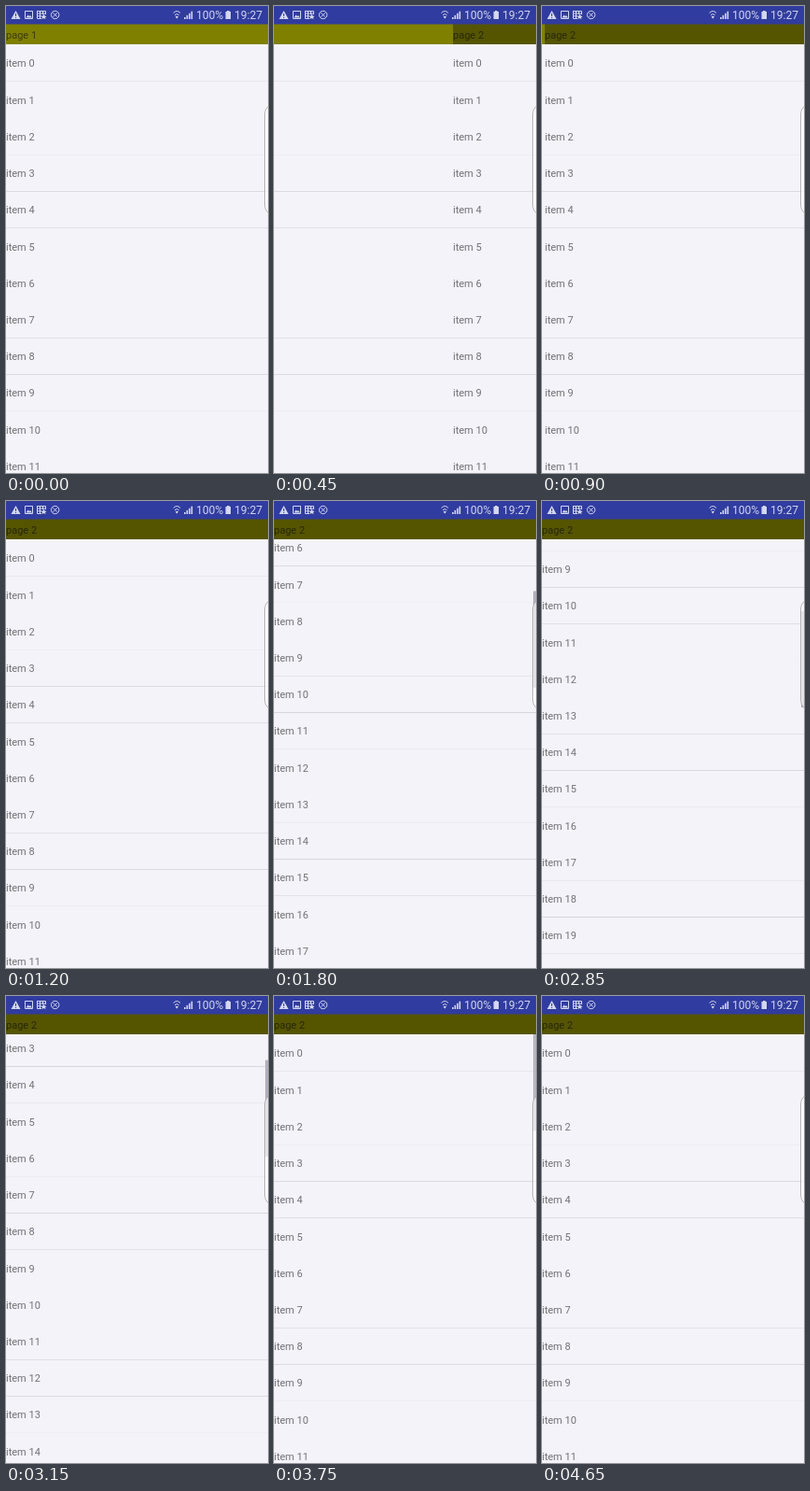
Recreate the animation shown at these times as an HTML page with a canvas. Size 281x500 px, loop 4.95 s.

```html
<!DOCTYPE html>
<html>
<head>
<meta charset="utf-8">
<style>
html, body { margin: 0; height: 100%; overflow: hidden; background: #f4f3f9; }
canvas { display: block; }
</style>
</head>
<body>
<canvas id="stage" width="281" height="500"></canvas>
<script>
const ctx = document.getElementById('stage').getContext('2d');
const W = 281, H = 500, LOOP = 4950, STEP = 150;
const LIST_TOP = 41, ROW = 39.23, ITEMS = 52, MAX_SCROLL = 606.5;
const LIST_H = H - LIST_TOP;

const clamp = (v, lo, hi) => Math.min(hi, Math.max(lo, v));

function rect(x, y, w, h, color) {
  ctx.fillStyle = color;
  ctx.fillRect(x, y, w, h);
}

function text(s, x, y, size, color) {
  ctx.font = size + 'px Roboto, sans-serif';
  ctx.fillStyle = color;
  ctx.fillText(s, x, y);
}

function stroke(d, color, width = 1) {
  ctx.strokeStyle = color;
  ctx.lineWidth = width;
  ctx.stroke(new Path2D(d));
}

function fill(d, color) {
  ctx.fillStyle = color;
  ctx.fill(new Path2D(d), 'evenodd');
}

// Distance of page 2 from its resting place
const pageOffset = t => clamp(3 * ((1050 - t) / 150) ** 3, 0, W);

// Fling down, then fling back to the top
function scrollAt(t) {
  const down = MAX_SCROLL - 360 * (Math.max(0, 2520 - t) / 720) ** 2;
  const back = 122.9 * (Math.max(0, 3600 - t) / 450) ** 2;
  return Math.max(0, Math.min(down, back));
}

const barAlpha = t => t < 1650 ? 0 : clamp((4050 - t) / 450, 0, 0.75) / 0.75;

function drawPage(number, x, headColor, scroll) {
  ctx.save();
  ctx.translate(x, 0);
  rect(0, 19, W, 22, headColor);
  text('page ' + number, 0, 34.5, 11, 'rgba(0,0,0,.54)');
  ctx.beginPath();
  ctx.rect(0, LIST_TOP, W, LIST_H);
  ctx.clip();
  rect(0, LIST_TOP, W, LIST_H, '#f4f3f9');
  for (let i = 0; i < ITEMS; i++) {
    const y = LIST_TOP + i * ROW - scroll;
    if (y < -ROW || y > H) continue;
    text('item ' + i, 0, y + 24.4, 11, '#727177');
    // Dividers fade out when they fall between two pixel rows
    const line = y + ROW, row = Math.round(line);
    const alpha = 0.13 * Math.max(0, 1 - 2.6 * Math.abs(line - row));
    rect(0, row, W, 1, `rgba(0,0,0,${alpha})`);
  }
  ctx.restore();
}

function drawScrollbar(scroll, alpha) {
  const ratio = LIST_H / (ITEMS * ROW);
  ctx.globalAlpha = alpha;
  rect(278, LIST_TOP + scroll * ratio, 3, LIST_H * ratio, '#b1b0bc');
  ctx.globalAlpha = 1;
}

function drawEdgeHandle() {
  const d = 'M281.5 107.5Q277.5 110 277.5 117V212Q277.5 219 281.5 221.5';
  fill(d + 'Z', 'rgba(255,255,255,.65)');
  stroke(d, '#a3a3a6', 0.8);
}

function drawStatusBar() {
  const ink = '#d3d7ee', bar = '#303c9f';
  rect(0, 0, W, 19.5, bar);
  // Warning
  fill('M10.5 5L15.5 14H5.5Z', ink);
  rect(10, 8, 1, 3, bar);
  rect(10, 12, 1, 1, bar);
  // Picture
  stroke('M20.5 5.5H28.5V13.5H20.5Z', ink);
  fill('M21.5 12.5L23.5 9.5L25 11L26 10L28 12.5Z', ink);
  // Table
  stroke('M33 5.5H42.5V9M33.5 5V13.5H38M33 8H42M33 10.8H38M36.5 5V13M39.5 5V9', ink);
  fill('M40.5 8.5L41.5 10.5L43.5 11L42 12.2L42.5 14.3L40.5 13L38.5 14.3L39 12.2L37.5 11L39.5 10.5Z', ink);
  // Crossed circle
  stroke('M48.5 9.5A4.2 4.2 0 1 1 56.9 9.5A4.2 4.2 0 1 1 48.5 9.5M50.6 7.4L54.8 11.6M54.8 7.4L50.6 11.6', ink);
  // Wireless
  stroke('M179.5 7.5Q183.2 3.5 187 7.5M181 9.7Q183.2 7.5 185.5 9.7', ink);
  fill('M181.5 11L183.2 13.8L185 11Z', ink);
  // Signal bars
  for (let i = 0; i < 4; i++) rect(191 + i * 2.5, 12 - i * 2.1, 1.6, 2 + i * 2.1, ink);
  text('100%', 204, 14, 12, ink);
  // Battery
  rect(237, 5, 2.5, 1.5, ink);
  rect(235.5, 6, 5.5, 8, ink);
  text('19:27', 245, 14, 12, ink);
}

function draw(now) {
  const t = Math.floor(now % LOOP / STEP) * STEP;
  const x = pageOffset(t), scroll = scrollAt(t);
  if (x > 0) drawPage(1, x - W, '#808000', 0);
  drawPage(2, x, '#555500', scroll);
  drawScrollbar(scroll, barAlpha(t));
  drawEdgeHandle();
  drawStatusBar();
}

const start = performance.now();
function tick() {
  draw(performance.now() - start);
  requestAnimationFrame(tick);
}
tick();
</script>
</body>
</html>
```
